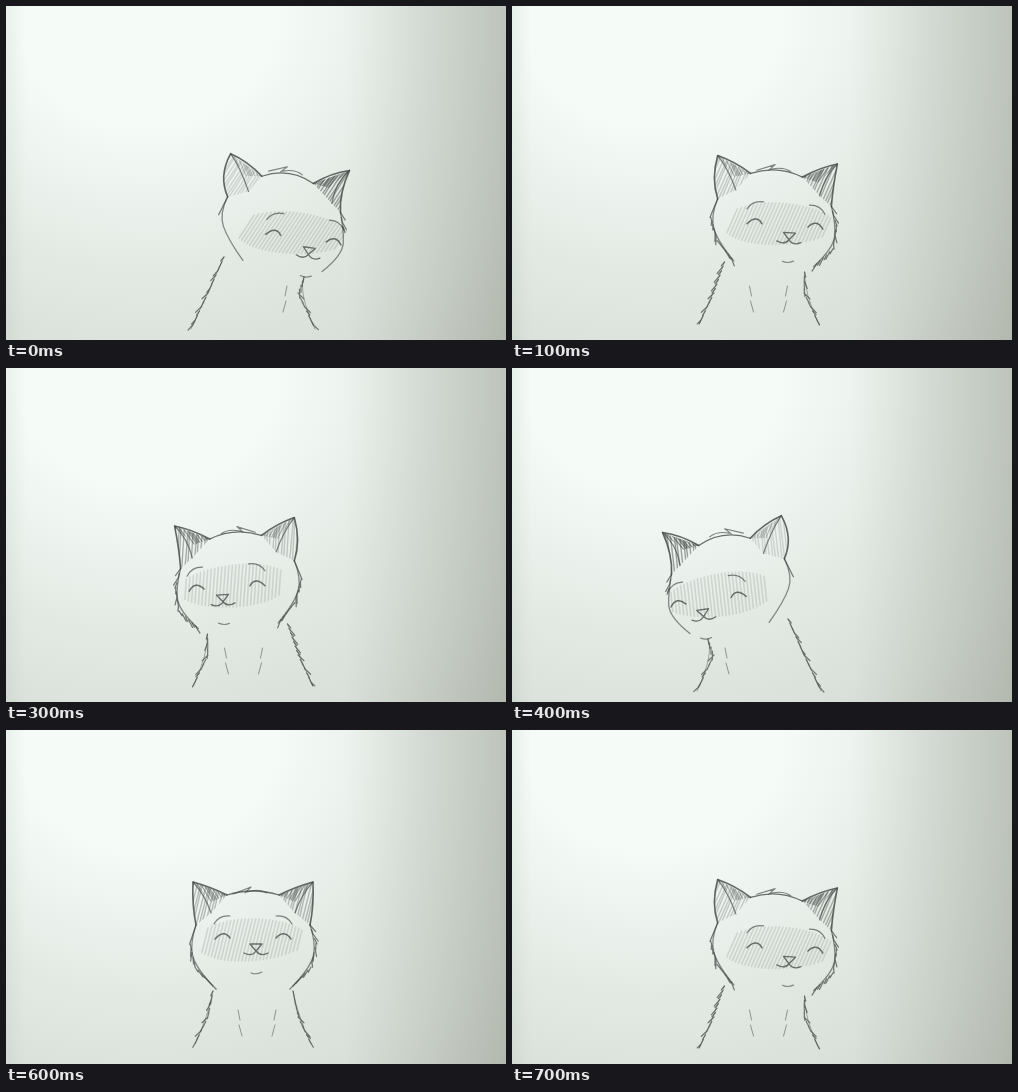
An HTML page with a canvas that plays this animation: 500x334 px, repeating every 0.8 s.

```html
<!DOCTYPE html>
<html lang="en">
<head>
<meta charset="utf-8">
<title>Swaying pencil cat</title>
<style>
html, body { margin: 0; width: 100%; height: 100%; overflow: hidden; }
body {
  background:
    linear-gradient(90deg, transparent 68%, rgba(100,105,90,.26)),
    linear-gradient(90deg, rgba(130,155,135,.1), transparent 4%),
    radial-gradient(ellipse 520px 480px at 28% 0, #f5fbf7 25%, #e3eae4 55%, #d8dfd8 80%, #cdd3cb);
}
canvas { display: block; }
</style>
</head>
<body>
<canvas id="c" width="500" height="334"></canvas>
<script>
const g = document.getElementById('c').getContext('2d');
const AXIS = 247, NECK = 260;

function pencil(path, width = 1.3, alpha = .75) {
  g.lineWidth = width;
  g.strokeStyle = `rgba(62,69,65,${alpha})`;
  g.stroke(new Path2D(path));
}

// Smooth line through a few points, rounding each inner corner.
function smooth(pts) {
  let d = `M${pts[0]}`;
  for (let i = 1; i < pts.length - 1; i++) {
    const [p, q] = [pts[i], pts[i + 1]];
    const end = i === pts.length - 2 ? q : [(p[0] + q[0]) / 2, (p[1] + q[1]) / 2];
    d += `Q${p} ${end}`;
  }
  return d;
}

// Short overlapping strokes that flick outwards along an edge.
function fur(pts, side) {
  let d = '';
  for (let i = 0; i < pts.length - 1; i++) {
    const [x, y] = pts[i], dx = pts[i + 1][0] - x, dy = pts[i + 1][1] - y;
    const a = Math.atan2(dy, dx), n = Math.ceil(Math.hypot(dx, dy) / 5);
    for (let k = 0; k < n; k++) {
      const px = x + dx * k / n, py = y + dy * k / n;
      const turn = a - side * (.18 + .2 * Math.sin(px * 3 + py));
      const size = 7 + 2 * Math.sin(py * 5);
      d += `M${px} ${py}l${Math.cos(turn) * size} ${Math.sin(turn) * size}`;
    }
  }
  pencil(d, 1.2, .7);
}

function hatch(area, lean, gap, alpha) {
  g.save();
  g.clip(new Path2D(area));
  let d = '';
  for (let x = -100; x < 100; x += gap)
    d += `M${x + lean * 30 + Math.sin(x * 7)} 145L${x - lean * 30} 205`;
  pencil(d, 1.4, alpha);
  g.restore();
}

function body(side, t) {
  const edge = [
    [side * 40 + 11 * t, 261 + 10 * side * t],
    [side * 45, 287],
    [side * (58 + 4 * t), 314 + 9 * t]
  ];
  pencil(smooth(edge), 1, .4);
  fur(edge, side);
  if (side > 0 || t < 1) {
    const x = side * 19 + 4 + 11 * t;
    pencil(`M${x} 280l${-side * 2} 10M${x - side} 295l${-side * 3} 11`, 1, .5);
  }
}

function ear(side, t, lean) {
  const tip = [side * 60, 152], inner = [side * 26, 165 + 5 * t];
  const outer = [side * 57, 195], fold = [side * 42 + 5 * t, 183 + 4 * t];
  const back = [side * 61 - 8 * t, 176];
  const shade = .32 + .15 * side * t;
  hatch(`M${tip}L${inner} ${fold} ${outer}Q${back} ${tip}`, lean, 3, shade);
  hatch(`M${tip}L${inner} ${side * 42} 172Z`, .6 * side, 2.5, shade + .1);
  pencil(`M${tip}Q${side * 42} 157 ${inner}M${tip}Q${back} ${outer}`, 1.6, .8);
  pencil(`M${tip}Q${side * 48} 165 ${fold}`, 1.2, .65);
}

function cheek(side, t) {
  const edge = [
    [side * 57, 195],
    [side * 63, 213],
    [side * 58 + 7 * t, 237],
    [side * 40 + 7 * t, 256]
  ];
  pencil(smooth(edge), 1.3, .6);
  fur(t === 1 ? edge.slice(0, 2) : edge, side);
}

function blush(t, lean) {
  let d = '';
  for (let x = -48; x <= 48; x += 3.5) {
    const half = 20 * Math.sqrt(1 - (x / 56) ** 2) + 2 * Math.sin(x * 9);
    d += `M${x - 10 * t + lean * half} ${210 - 6 * t - half}l${-2 * lean * half} ${2 * half}`;
  }
  pencil(d, 1.6, .15);
}

function face(t, lean) {
  blush(t, lean);
  for (const side of [-1, 1]) {
    const s = side;
    pencil(`M${s * 23} 208Q${s * 30 + 1} 199 ${s * 38} 209`, 1.5);
    pencil(`M${s * 23} 186Q${s * 34} 185 ${s * 39} 194`, 1.2, .65);
  }
  g.translate(3 + 4 * t, 2 * t);
  pencil('M-6 214L6 214L0 221ZM-12 223Q-4 227 0 221Q5 227 12 223');
  pencil('M-5 243Q0 245 6 242', 1.1, .6);
}

function draw(turn) {
  const t = Math.abs(turn), flip = turn < 0 ? -1 : 1;
  const lean = flip * (.25 + .22 * turn);
  g.setTransform(flip, 0, 0, 1, AXIS, 0);
  g.clearRect(-300, 0, 600, 334);
  for (const side of [-1, 1]) body(side, t);

  g.translate(22 * t, NECK + 3 * t);
  g.rotate(.14 * t);
  g.translate(0, -NECK);
  for (const side of [-1, 1]) {
    ear(side, t, lean);
    cheek(side, t);
  }
  pencil(`M-26 ${165 + 5 * t}Q0 157 26 ${165 + 5 * t}`);
  pencil('M-20 164L-2 157L-8 163M-6 162Q6 158 14 163', 1.1, .65);

  g.translate(24 * t, 18 * t);
  face(t, lean);
}

g.lineCap = g.lineJoin = 'round';
function tick() {
  const step = Math.floor(performance.now() / 100) % 8;
  draw(Math.abs(step - 4) / 2 - 1);
  requestAnimationFrame(tick);
}
tick();
</script>
</body>
</html>
```
